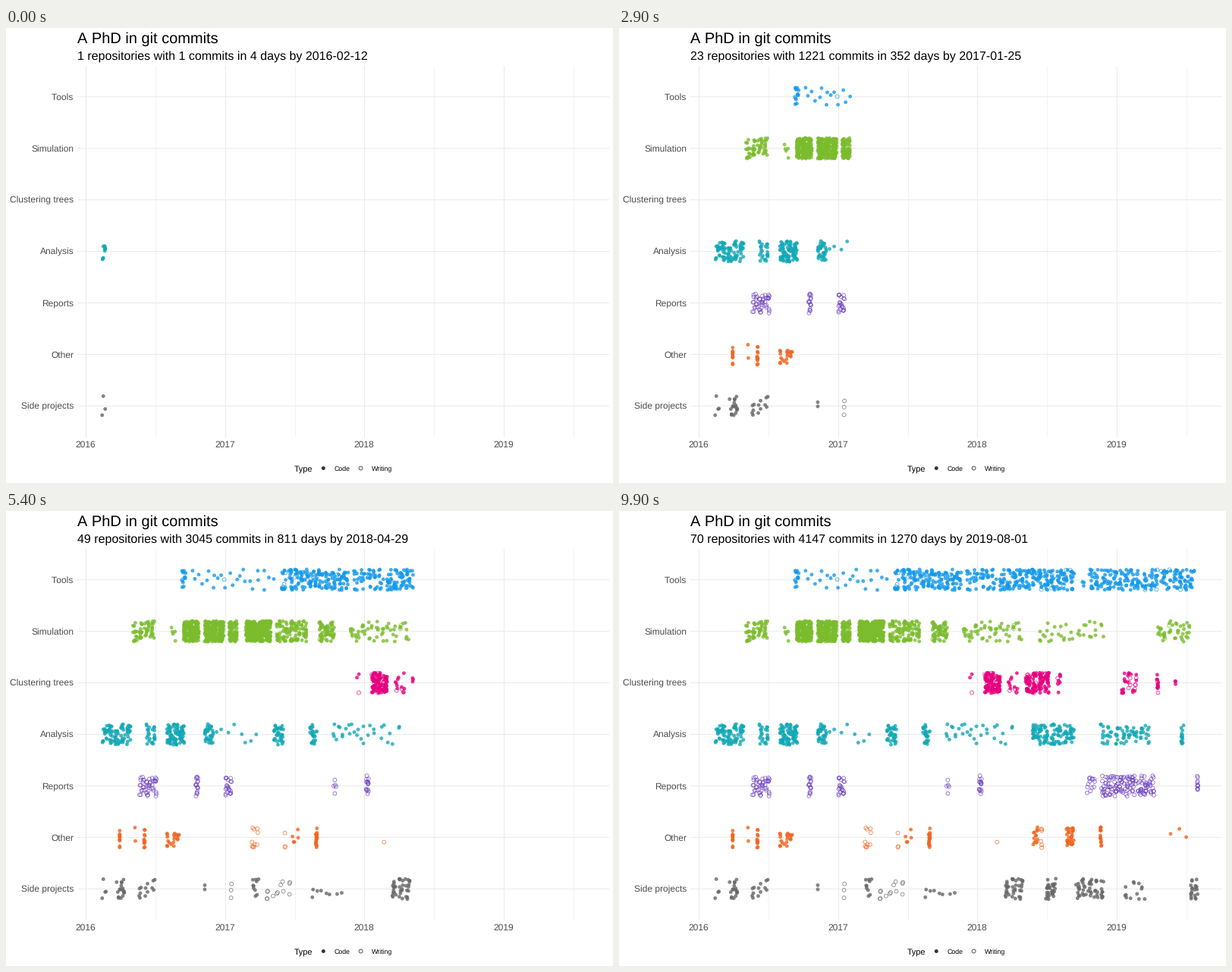
A matplotlib script for the animation above (10 s loop, 800 px wide and 600 px high).

```python
import random

import matplotlib.pyplot as plt
import numpy as np
from matplotlib.animation import FuncAnimation
from matplotlib.colors import to_rgba

# A kerning factor of 6 makes kerning negligible, as in the plain chart type.
plt.rcParams.update({"font.family": "Liberation Sans", "text.hinting": "none",
                     "text.kerning_factor": 6})

W, H = 800, 600
FRAMES, STEP_MS = 100, 100
HOLD, MOVES = 10, 69          # still frames at the start, then moving steps
FIRST_DAY, LAST_DAY = 4, 1270
START = np.datetime64("2016-02-08")
JAN_2016, DAY_PX, YEAR_PX = 105.1, 0.50274, 183.6
ROW_TOP, ROW_GAP, JITTER = 90.7, 67.95, 13.6
SESSION_PX = 8                # usual distance between bursts of work
GRID, AXIS_TEXT, KEY = "#ebebeb", "#4d4d4d", "#333333"

# Known totals along the way; values between follow the visible points.
DAYS = [4, 95, 352, 646, 976, 1196, 1270]
COMMITS = [1, 119, 1221, 2686, 3512, 4014, 4147]
REPOS = [1, 5, 23, 39, 60, 67, 70]

# Name, colour, share of writing, active spans as (from x, to x, commits).
ROWS = [
    ("Tools", "#1499ea", 0.06,
     [(232, 238, 13), (245, 361, 26), (363, 453, 165), (458, 500, 48),
      (502, 602, 190), (610, 616, 3), (619, 729, 165), (731, 760, 50)]),
    ("Simulation", "#7bbc2d", 0.02,
     [(167, 198, 55), (217, 224, 5), (234, 256, 190), (262, 289, 240),
      (294, 306, 75), (316, 351, 360), (356, 398, 105), (413, 434, 65),
      (452, 534, 55), (553, 643, 35), (709, 755, 42)]),
    ("Clustering trees", "#e6007e", 0.2,
     [(458, 466, 3), (482, 504, 115), (513, 527, 13), (536, 569, 115),
      (578, 582, 9), (662, 684, 28), (709, 711, 13), (733, 734, 3)]),
    ("Analysis", "#12a8b6", 0,
     [(127, 167, 85), (185, 198, 24), (212, 237, 85), (262, 273, 34),
      (276, 337, 8), (353, 368, 34), (400, 411, 26), (427, 521, 30),
      (543, 602, 115), (635, 702, 70), (740, 745, 14)]),
    ("Reports", "#6f42c1", 1,
     [(176, 201, 45), (250, 253, 16), (289, 297, 22), (431, 436, 5),
      (474, 478, 15), (617, 629, 13), (636, 707, 140), (762, 763, 10)]),
    ("Other", "#f0641e", 0,
     [(150, 150, 10), (170, 171, 2), (182, 183, 12), (210, 231, 20),
      (375, 390, 5), (408, 410, 18), (546, 552, 13), (589, 602, 30),
      (634, 636, 15), (720, 752, 3)]),
    ("Side projects", "#666666", 0,
     [(126, 133, 4), (145, 156, 17), (175, 199, 13), (262, 262, 2),
      (325, 333, 10), (402, 449, 8), (508, 535, 36), (562, 578, 30),
      (602, 641, 48), (666, 695, 13), (752, 764, 20)]),
]
# Separate spells of writing in rows that are otherwise code.
WRITING = {"Other": [(323, 332, 10), (367, 368, 3), (498, 498, 1), (556, 558, 6)],
           "Side projects": [(295, 298, 3), (343, 378, 13)]}

rng = random.Random(7)


def row_y(row):
    return ROW_TOP + ROW_GAP * row


def span_points(row, color, share, left, right, commits):
    """Commits of one span, gathered in evenly spaced sessions of work."""
    sessions = max(1, min(round((right - left) / SESSION_PX), commits))
    slot = (right - left) / sessions
    length = slot if sessions == 1 else 0.75 * slot
    for i in range(commits):
        x = left + i % sessions * slot + rng.uniform(0, length)
        day = round((x - JAN_2016) / DAY_PX)
        y = row_y(row) + rng.uniform(-JITTER, JITTER)
        yield JAN_2016 + day * DAY_PX, y, color, rng.random() < share


points = []
for row, (name, color, share, spans) in enumerate(ROWS):
    for span in spans:
        points += span_points(row, color, share, *span)
    for span in WRITING.get(name, []):
        points += span_points(row, color, 1, *span)

points.sort(key=lambda p: p[0])
places = np.array([p[:2] for p in points])
faces = np.array([to_rgba(c, 0 if hollow else 0.8) for _, _, c, hollow in points])
edges = np.array([to_rgba(c, 0.8 if hollow else 0) for _, _, c, hollow in points])


def visible(day):
    """Number of points due by the step nearest to this day."""
    half_step = (LAST_DAY - FIRST_DAY) / MOVES / 2
    edge = JAN_2016 + (38 + day + half_step) * DAY_PX
    return int(np.searchsorted(places[:, 0], edge))


seen_at = [visible(day) for day in DAYS]

fig = plt.figure(figsize=(W / 72, H / 72), dpi=72, facecolor="white")
ax = fig.add_axes([0, 0, 1, 1])
ax.set(xlim=(0, W), ylim=(H, 0))
ax.axis("off")


def label(x, y, text, size, color="black", ha="left"):
    return ax.text(x, y, text, fontsize=size, color=color, ha=ha, va="baseline")


def grid_line(xs, ys, width=1.07, snap=True):
    ax.plot(xs, ys, color=GRID, lw=width, snap=snap, zorder=1)


for i in range(4):
    x = 105 + YEAR_PX * i
    grid_line([x, x], [50, 538.5])
    grid_line([x + YEAR_PX / 2 + 0.2] * 2, [50, 538.5], width=0.6)
    label(x, 553, str(2016 + i), 12, AXIS_TEXT, "center")
for row, (name, *_) in enumerate(ROWS):
    grid_line([94.5, 794.5], [row_y(row)] * 2, snap=False)
    label(89.3, row_y(row) + 4.4, name, 12, AXIS_TEXT, "right")

label(94.2, 20.2, "A PhD in git commits", 20)
subtitle = label(94.2, 41.2, "", 16)

label(379.7, 585, "Type", 11)
label(432.4, 584, "Code", 8.8)
label(481.8, 584, "Writing", 8.8)
ax.scatter([418.3, 467.6], [580.5, 580.5], s=4.9 ** 2, lw=0.8, zorder=3,
           facecolors=[KEY, "none"], edgecolors=["none", KEY])

commits = ax.scatter([], [], s=4.85 ** 2, lw=0.8, zorder=2)


def draw(frame):
    progress = min(max(frame - HOLD, 0), MOVES) / MOVES
    day = FIRST_DAY + (LAST_DAY - FIRST_DAY) * progress
    seen = visible(day)
    commits.set_offsets(places[:seen])
    commits.set_facecolor(faces[:seen])
    commits.set_edgecolor(edges[:seen])
    repos = int(np.interp(int(day), DAYS, REPOS))
    total = round(np.interp(seen, seen_at, COMMITS))
    subtitle.set_text(f"{repos} repositories with {total} commits "
                      f"in {int(day)} days by {START + int(day)}")
    return commits, subtitle


animation = FuncAnimation(fig, draw, frames=FRAMES, interval=STEP_MS, repeat=True)
plt.show()
```
